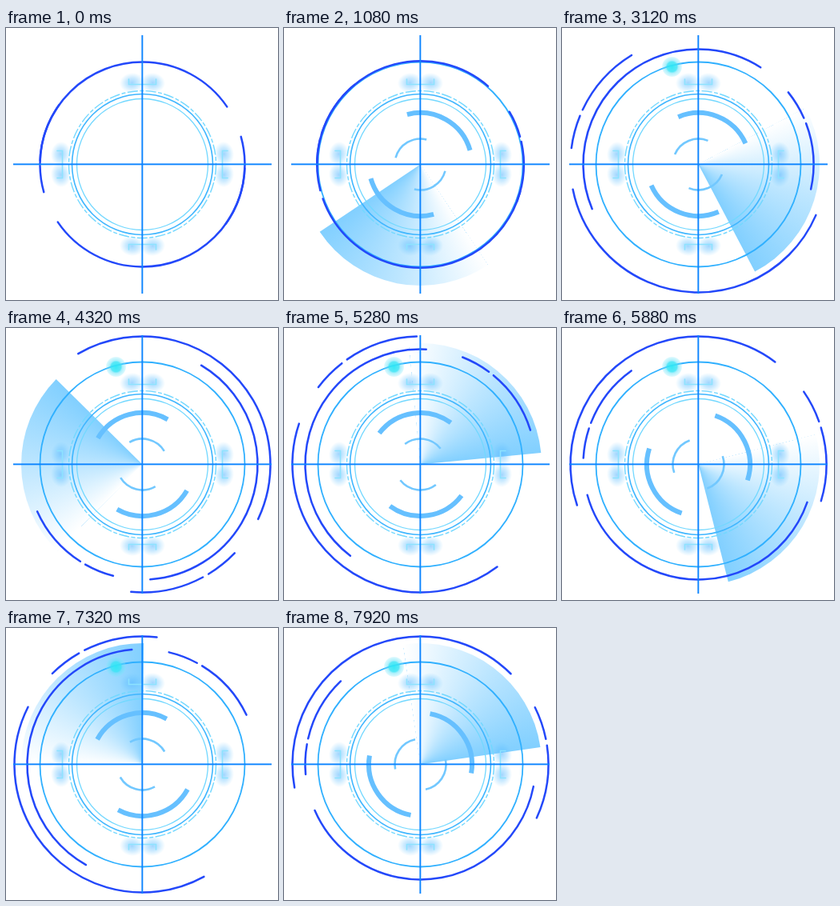
Write an HTML page with a canvas that moves like this. It is 340 px wide and 340 px high and loops after 8.04 s.

```html
<!DOCTYPE html>
<html lang="en">
<head>
<meta charset="utf-8">
<title>Radar sweep</title>
<style>
html, body { margin: 0; width: 100%; height: 100%; overflow: hidden; background: #fff; }
canvas { display: block; width: 340px; height: 340px; }
</style>
</head>
<body>
<canvas id="stage"></canvas>
<script>
const SIZE = 340, C = 170.5, LOOP = 8040, STEP = 120;
const SPIN = 0.18046;   // ring speed, degrees per ms
const SWEEP = 0.13533;  // beam speed
const DEG = Math.PI / 180;

const canvas = document.getElementById('stage');
const ctx = canvas.getContext('2d');
const dpr = window.devicePixelRatio || 1;
canvas.width = canvas.height = SIZE * dpr;

const ramp = (t, a, b) => Math.min(1, Math.max(0, (t - a) / (b - a)));

function arc(r, from, to, width, color, cap = 'butt') {
  ctx.beginPath();
  ctx.arc(0, 0, r, from * DEG, to * DEG);
  ctx.lineWidth = width;
  ctx.strokeStyle = color;
  ctx.lineCap = cap;
  ctx.stroke();
}

function disc(x, y, r, stops) {
  const g = ctx.createRadialGradient(x, y, 0, x, y, r);
  stops.forEach(([at, color]) => g.addColorStop(at, color));
  ctx.fillStyle = g;
  ctx.beginPath();
  ctx.arc(x, y, r, 0, 2 * Math.PI);
  ctx.fill();
}

// Broken ring: one long arc followed by two short ones
function brokenRing(r, start) {
  [[0, 146], [164, 179.6], [181.9, 215.8]].forEach(([a, b]) =>
    arc(r, start + a + 0.3, start + b - 0.3, 2.5, '#2348fa', 'round'));
}

function arcPair(r, start, width, color) {
  for (const turn of [0, 180]) arc(r, start + turn, start + turn + 89, width, color);
}

function beam(lead) {
  const span = 90;
  const g = ctx.createConicGradient((lead - span) * DEG, 0, 0);
  g.addColorStop(0, 'rgba(70,185,255,0)');
  g.addColorStop(span / 720, 'rgba(70,185,255,0.36)');
  g.addColorStop(span / 360, 'rgba(70,185,255,0.68)');
  g.addColorStop(1, 'rgba(70,185,255,0.68)');
  ctx.fillStyle = g;
  ctx.beginPath();
  ctx.moveTo(0, 0);
  ctx.arc(0, 0, 151.5, (lead - span) * DEG, lead * DEG);
  ctx.fill();
}

// Glowing bracket, drawn at the top and turned to each side
function bracket(turn) {
  ctx.save();
  ctx.rotate(turn * DEG);
  for (const side of [-1, 1]) {
    ctx.save();
    ctx.translate(side * 13, -102);
    ctx.rotate(side * 0.12);
    ctx.scale(1.25, 1);
    disc(0, 0, 12.5, [[0, 'rgba(85,180,255,0.55)'], [0.5, 'rgba(95,190,255,0.32)'], [1, 'rgba(110,200,255,0)']]);
    ctx.restore();
  }
  ctx.beginPath();
  ctx.moveTo(-17, -106.5);
  ctx.lineTo(-17, -100);
  ctx.lineTo(17, -100);
  ctx.lineTo(17, -106.5);
  ctx.lineWidth = 1.6;
  ctx.strokeStyle = '#8de2ff';
  ctx.stroke();
  ctx.restore();
}

function blip(t) {
  const show = ramp(t, 1860, 2000);
  if (!show) return;
  ctx.globalAlpha = 0.5 + 0.5 * show;
  const r = 8 + 5 * show;
  disc(-33, -122, r, [
    [0, 'rgba(45,232,245,0.95)'], [0.48, 'rgba(60,228,245,0.85)'],
    [0.62, 'rgba(90,225,248,0.5)'], [0.9, 'rgba(120,230,250,0.3)'], [1, 'rgba(130,235,250,0)']
  ]);
  ctx.globalAlpha = 1;
}

function draw(t) {
  ctx.setTransform(dpr, 0, 0, dpr, 0, 0);
  ctx.fillStyle = '#fff';
  ctx.fillRect(0, 0, SIZE, SIZE);
  ctx.translate(C, C);

  const fade = ramp(t, 0, 1000);
  const grow = ramp(t, 1000, 2000);
  const spread = ramp(t, 2000, 2500);

  ctx.globalAlpha = fade;
  beam(t * SWEEP);
  ctx.globalAlpha = 1;

  for (let i = 0; i < 4; i++) bracket(i * 90);

  ctx.setLineDash([13, 2.5, 5, 2.5]);
  arc(92, 0, 360, 1.4, '#73d8ff');
  ctx.setLineDash([]);
  arc(88, 0, 360, 1.6, '#3fb6ff');
  arc(82, 0, 360, 1.3, '#73d8ff');

  ctx.globalAlpha = fade;
  arcPair(64.5, 90 - t * SPIN, 6, '#66c0ff');
  arcPair(32, t * SPIN, 2.6, '#72c8ff');
  ctx.globalAlpha = 1;

  if (t >= 1000) arc(128, 0, 360, 1.8, '#30b0ff');
  blip(t);

  const r = 128 + 16 * grow;
  brokenRing(r, -t * SPIN);
  brokenRing(r + 16 * spread, 180 + t * SPIN);

  ctx.fillStyle = '#0c84ff';
  ctx.fillRect(-161.5, -1.1, 323, 1.9);
  ctx.fillRect(-1.1, -161.5, 1.9, 323);
}

const begin = performance.now();
function tick() {
  const t = (performance.now() - begin) % LOOP;
  draw(Math.floor(t / STEP) * STEP);
  requestAnimationFrame(tick);
}
tick();
</script>
</body>
</html>
```
